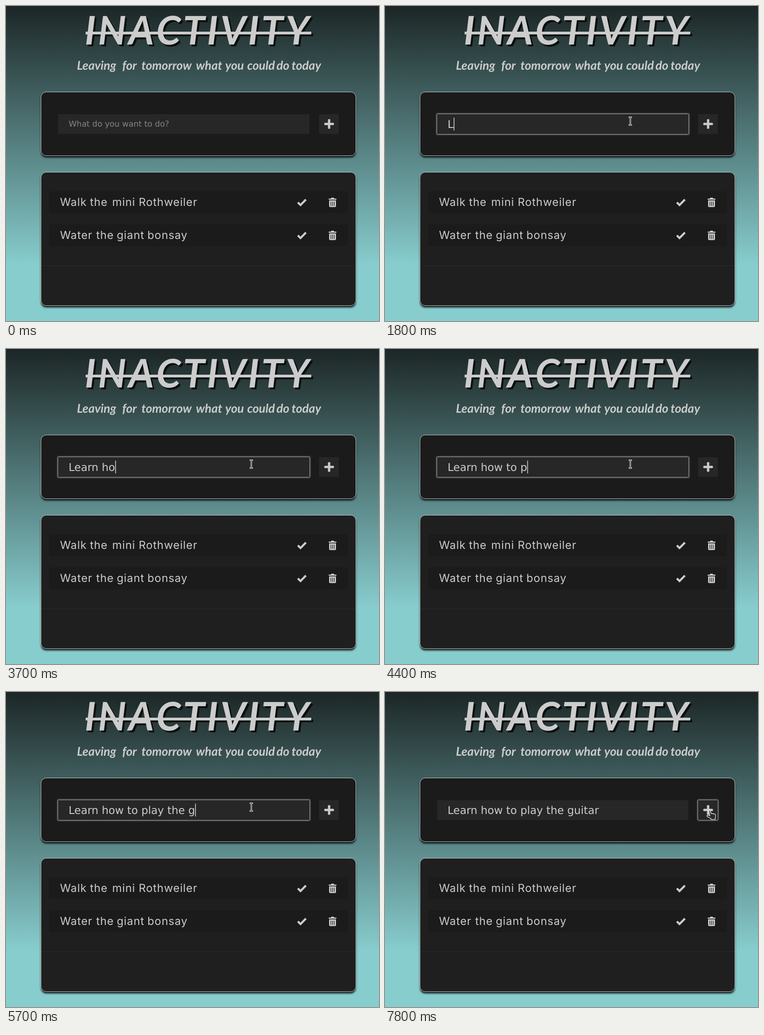
An HTML page for the animation above (8000 ms loop, 815 px wide and 687 px high).

```html
<!DOCTYPE html>
<html lang="en">
<head>
<meta charset="utf-8">
<title>Inactivity</title>
<style>
  html, body { margin: 0; width: 100%; height: 100%; overflow: hidden; }
  body { position: relative; background: linear-gradient(#1c2626, #88cdce 565px); }
  div, svg { position: absolute; box-sizing: border-box; }
  svg { left: 0; top: 0; }
  .card {
    left: 76px; width: 689px; border: 1px solid #ccc; border-radius: 12px;
    background: #1b1b1b; box-shadow: 0 4px 4px -1px #000;
  }
  #form { top: 187px; height: 140px; }
  #list { top: 362px; height: 292px; background: #1f1f1f; }
  .row { left: 94px; width: 653px; height: 48px; background: #1b1b1b; border-radius: 2px; }
  .rule { left: 77px; top: 566px; width: 687px; height: 1px; background: #2b2b2b; }
  .field { top: 236px; height: 43px; background: #272727; }
  #input { left: 114px; width: 549px; }
  #add { left: 684px; width: 43px; border-radius: 2px; }
  .focus { box-shadow: 0 0 3px 1px #ccc; }
  text { fill: #ccc; white-space: pre; text-rendering: geometricPrecision; }
  .title { font: italic 700 86px Lato, sans-serif; letter-spacing: 4.8px; font-kerning: none; }
  .head { fill: #ccc; filter: drop-shadow(4px 4px 0 #0b0e0e); }
  .motto { font: italic 700 26.5px Lato, sans-serif; }
  .task { font: 400 24px Inter, sans-serif; letter-spacing: .9px; }
  #hint { font: 17.5px "DejaVu Sans", sans-serif; fill: #848484; }
  #typed { font: 23.33px "DejaVu Sans", sans-serif; }
  #pointer > g { display: none; }
</style>
</head>
<body>
<div class="card" id="form"></div>
<div class="card" id="list"></div>
<div class="field" id="input"></div>
<div class="field" id="add"></div>
<div class="row" style="top:404px"></div>
<div class="row" style="top:476px"></div>
<div class="rule"></div>

<svg width="815" height="687" viewBox="0 0 815 687">
  <defs>
    <g id="icons">
      <path d="M637.700 428.300 L643.500 434 L655.300 422.200" fill="none" stroke="#ccc" stroke-width="4.500"/>
      <g fill="#ccc">
        <rect x="705" y="420" width="17" height="2.600" rx=".8"/>
        <path d="M709.500 420.500 L711 418 H716 L717.500 420.500 Z"/>
        <path d="M706 424 H721 V436 Q721 438.500 718.500 438.500 H708.500 Q706 438.500 706 436 Z"/>
      </g>
      <path d="M709.800 426.500 V436 M713.500 426.500 V436 M717.200 426.500 V436" stroke="#1b1b1b" stroke-width="1.300"/>
    </g>
  </defs>

  <g class="head">
    <text class="title" x="172" y="83.500">INACTIVITY</text>
    <rect x="174" y="56" width="493" height="6"/>
  </g>
  <text class="motto" y="138.500"><tspan x="155">Leaving</tspan><tspan x="254">for</tspan><tspan x="296">tomorrow</tspan><tspan x="415">what</tspan><tspan x="479">you</tspan><tspan x="527">could</tspan><tspan x="591">do</tspan><tspan x="624">today</tspan></text>

  <text id="hint" x="137" y="263">What do you want to do?</text>
  <text id="typed" x="136.700" y="266"></text>
  <rect id="caret" y="243.500" width="1.500" height="28" fill="#ddd"/>

  <g fill="#ccc">
    <rect x="695.500" y="254.700" width="21" height="5" rx="1.500"/>
    <rect x="703.500" y="246.700" width="5" height="21" rx="1.500"/>
  </g>

  <text class="task" y="436"><tspan x="118">Walk</tspan><tspan x="183.500">the</tspan><tspan x="232">mini</tspan><tspan x="290">Rothweiler</tspan></text>
  <text class="task" y="508"><tspan x="118">Water</tspan><tspan x="197">the</tspan><tspan x="242">giant</tspan><tspan x="309">bonsay</tspan></text>
  <use href="#icons"/>
  <use href="#icons" y="72"/>

  <g id="pointer">
    <g id="arrow">
      <path d="M0 0 V18 L4.200 14.300 L7.200 21 L10.300 19.600 L7.300 13 H13 Z" fill="#1c1c1c" stroke="#fff" stroke-width="1.200"/>
    </g>
    <g id="beam" fill="none">
      <path d="M-3.500 -8.500 H3.500 M0 -8.500 V8.500 M-3.500 8.500 H3.500" stroke="#e8e8e8" stroke-width="3"/>
      <path d="M-2.500 -8.500 H2.500 M0 -8.500 V8.500 M-2.500 8.500 H2.500" stroke="#222" stroke-width="1"/>
    </g>
    <g id="hand">
      <path d="M-1.500 1.500 Q-1 -.5 1 .3 L4 7.300 Q6 6.300 7 7.700 Q9 6.700 10 8.200 Q12.500 7.600 13 10 Q14 14.500 12.500 17 L12.500 20 H3.500 L2.800 17.800 L-5 13.700 Q-6.500 11.600 -4.300 10.900 L1 12 Z" fill="#2a2a2a" stroke="#fff" stroke-width="1.200" stroke-linejoin="round"/>
    </g>
  </g>
</svg>

<script>
  const LOOP = 8000, TEXT = "Learn how to play the guitar";
  const $ = id => document.getElementById(id);

  // [time, letters typed]
  const keys = [
    [0, 0], [1800, 1], [2100, 2], [2200, 3], [2900, 6], [3500, 7],
    [3700, 8], [3800, 9], [3900, 10], [4000, 11], [4100, 12], [4200, 13],
    [4400, 14], [4500, 15], [4600, 16], [4700, 17], [4900, 18], [5100, 19],
    [5300, 20], [5400, 21], [5500, 22], [5700, 23], [5800, 24], [5900, 25],
    [6100, 26], [6200, 27], [6400, 28]
  ];
  // [time, x, y, shape]
  const moves = [
    [0, 0, 0, ""], [100, 785, 354, "arrow"], [200, 728, 330, "arrow"],
    [300, 655, 298, "arrow"], [400, 578, 265, "beam"], [500, 536, 251, "beam"],
    [7400, 622, 261, "beam"], [7600, 691, 264, "hand"], [7700, 709, 258, "hand"]
  ];
  // [time, caret shown]
  const blinks = [[0, false], [600, true], [900, false], [1800, true],
    [3400, false], [3500, true], [7000, false]];

  const at = (list, t) => list.findLast(step => step[0] <= t);
  const show = (el, on) => el.style.display = on ? "inline" : "none";

  function draw(t) {
    const typed = TEXT.slice(0, at(keys, t)[1]);
    $("typed").textContent = typed;
    show($("hint"), !typed);

    const end = typed ? $("typed").getSubStringLength(0, typed.length) : 0;
    $("caret").setAttribute("x", 137 + end);
    show($("caret"), at(blinks, t)[1]);

    $("input").classList.toggle("focus", t >= 600 && t < 7800);
    $("add").classList.toggle("focus", t >= 7800);

    const [, x, y, shape] = at(moves, t);
    $("pointer").setAttribute("transform", `translate(${x} ${y})`);
    for (const id of ["arrow", "beam", "hand"]) show($(id), id === shape);
  }

  const start = performance.now();
  function tick() {
    draw((performance.now() - start) % LOOP);
    requestAnimationFrame(tick);
  }
  tick();
</script>
</body>
</html>
```
